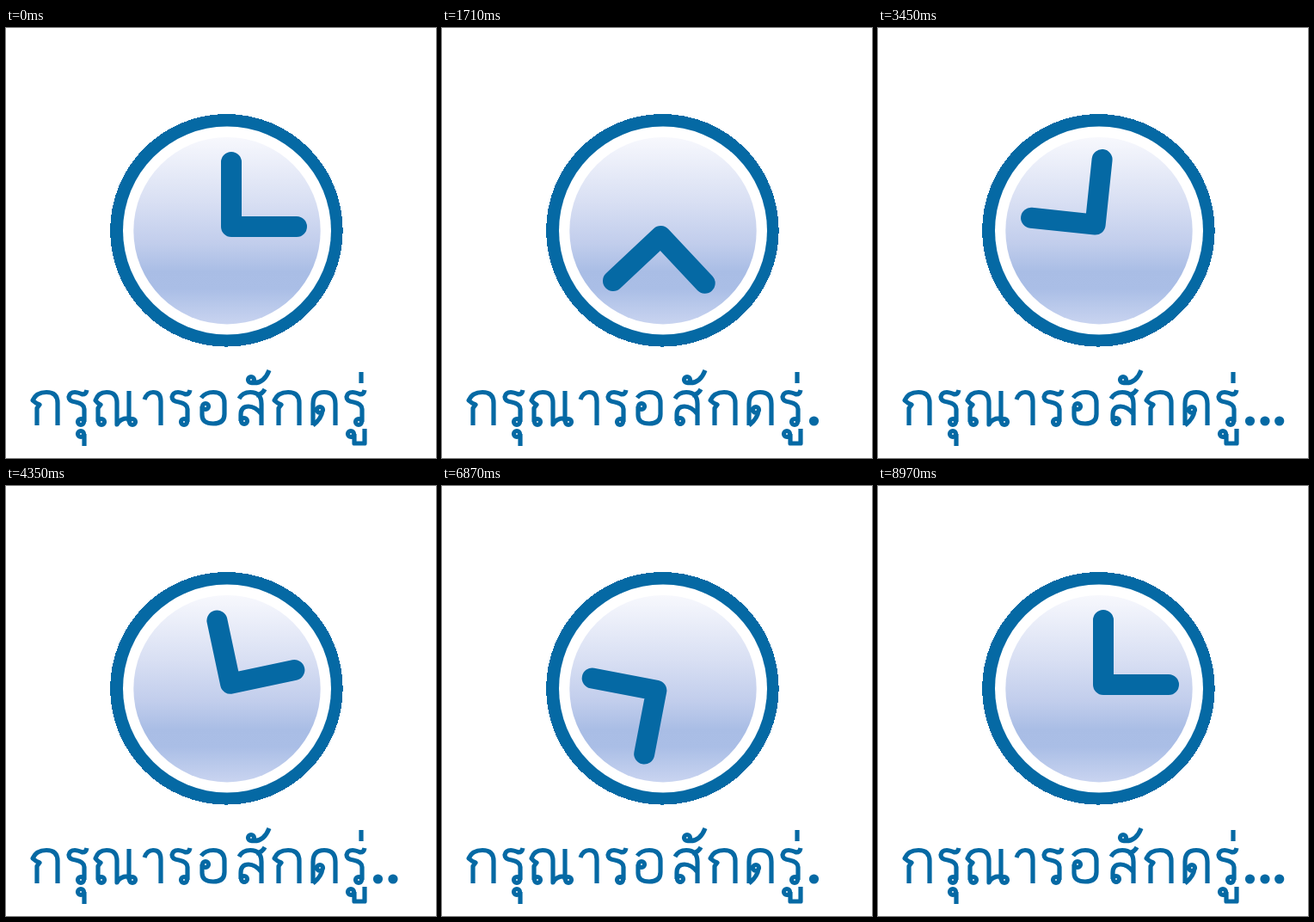
An HTML page for the animation above (9000 ms loop, 500 px wide and 500 px high).

```html
<!DOCTYPE html>
<html lang="th">
<head>
<meta charset="utf-8">
<style>
  html, body { margin: 0; width: 100%; height: 100%; overflow: hidden; background: #fff; }
  svg { display: block; width: 100vw; height: 100vh; }
  .line { fill: none; stroke: #0569a4; stroke-linejoin: round; }
</style>
</head>
<body>
<svg viewBox="0 0 500 500" role="img" aria-label="กรุณารอสักครู่...">
  <defs>
    <linearGradient id="face" x1="0" y1="0" x2="0" y2="1">
      <stop offset="0" stop-color="#f7f8fd"/>
      <stop offset=".35" stop-color="#d8dff3"/>
      <stop offset=".57" stop-color="#c1cdec"/>
      <stop offset=".72" stop-color="#a9bde5"/>
      <stop offset=".81" stop-color="#aabee6"/>
      <stop offset="1" stop-color="#c9d4f0"/>
    </linearGradient>
  </defs>
  <circle cx="256.4" cy="235.3" r="135.3" fill="#0569a4" shape-rendering="crispEdges"/>
  <circle cx="257" cy="235.5" r="121" fill="#fff"/>
  <circle cx="257" cy="235.7" r="108.7" fill="url(#face)"/>
  <path id="hands" class="line" d="M262 156V231H338" stroke-width="24" stroke-linecap="round"/>
  <g id="message" class="line" stroke-width="5.2"></g>
  <g id="dots" fill="#0569a4"></g>
</svg>
<script>
const LOOP = 9000, STEP = 30, DOT_STEP = 900, HALF = 4500;
const byId = id => document.getElementById(id);

function add(parent, tag, attrs) {
  const node = document.createElementNS("http://www.w3.org/2000/svg", tag);
  for (const name in attrs) node.setAttribute(name, attrs[name]);
  parent.appendChild(node);
  return node;
}

const ring = (x, y) => `M${x - 3.5} ${y}a3.5 3.5 0 1 0 7 0a3.5 3.5 0 1 0-7 0`;

// Thai letter strokes, each drawn from its left edge on the baseline.
const letters = {
  "ก": "M7 0V-20L10-24Q5-26 2-29Q6-38.5 18-38.5Q31-38.5 31-26V0",
  "ร": ring(17, -4) + "M21-4V-19Q21-25 11-27Q3-28 3-33Q4-38.5 10-38.5Q13-38.5 19-36Q23-36 24-41",
  "ณ": ring(9, -4) + "M5-4V-20L8-24Q4-26 2-29Q5-38.5 15-38.5Q27-38.5 27-26V-1Q31-9 42-8M41-40V-4" + ring(45, -4),
  "า": "M2-30Q5-38.5 12-38.5Q21-38.5 21-28V0",
  "อ": ring(9, -22) + "M5-22V-12Q5-2 18-2Q31-2 31-13V-26Q31-38.5 18-38.5Q9-38.5 4-32",
  "ส": ring(10, -5) + "M6-5V-12Q6-22 15-22Q23-22 30-13M30 0V-25Q30-38.5 17-38.5Q8-38.5 4-31M24-35Q31-36 34-42",
  "ค": ring(13, -18) + "M5 0V-25Q5-38.5 18-38.5Q31-38.5 31-25V0M5 0Q15-8 16-17",
  "ุ": ring(5, 10) + "M9 10V24",
  "ู": ring(5, 10) + "M9 10V21H21V4",
  "ั": ring(4, -53) + "M2-50Q18-46 25-64",
  "่": "M0-62V-49"
};

const layout = [
  ["ก", 29], ["ร", 70], ["ุ", 82], ["ณ", 102], ["า", 159], ["ร", 190],
  ["อ", 223], ["ส", 267], ["ั", 281], ["ก", 310], ["ค", 352], ["ร", 393],
  ["ู", 396], ["่", 413]
];
for (const [letter, x] of layout)
  add(byId("message"), "path", { d: letters[letter], transform: `translate(${x} 462)` });

const dots = [432.5, 450, 466.7].map(cx =>
  add(byId("dots"), "circle", { cx, cy: 457, r: 5.6 }));

function draw(time) {
  const t = Math.floor((time % LOOP) / STEP) * STEP;
  // The second turn reaches its end on the last step of the loop.
  const turn = t < HALF ? t / HALF : (t - HALF) / (LOOP - STEP - HALF);
  byId("hands").setAttribute("transform", `rotate(${turn * 360} 256 235)`);

  // The dots count up to three, down to none, then up again.
  const phase = Math.floor(t / DOT_STEP) % 6;
  const count = 3 - Math.abs(3 - phase);
  dots.forEach((dot, i) => dot.setAttribute("visibility", i < count ? "visible" : "hidden"));
}

const start = performance.now();
function tick() {
  draw(performance.now() - start);
  requestAnimationFrame(tick);
}
tick();
</script>
</body>
</html>
```
